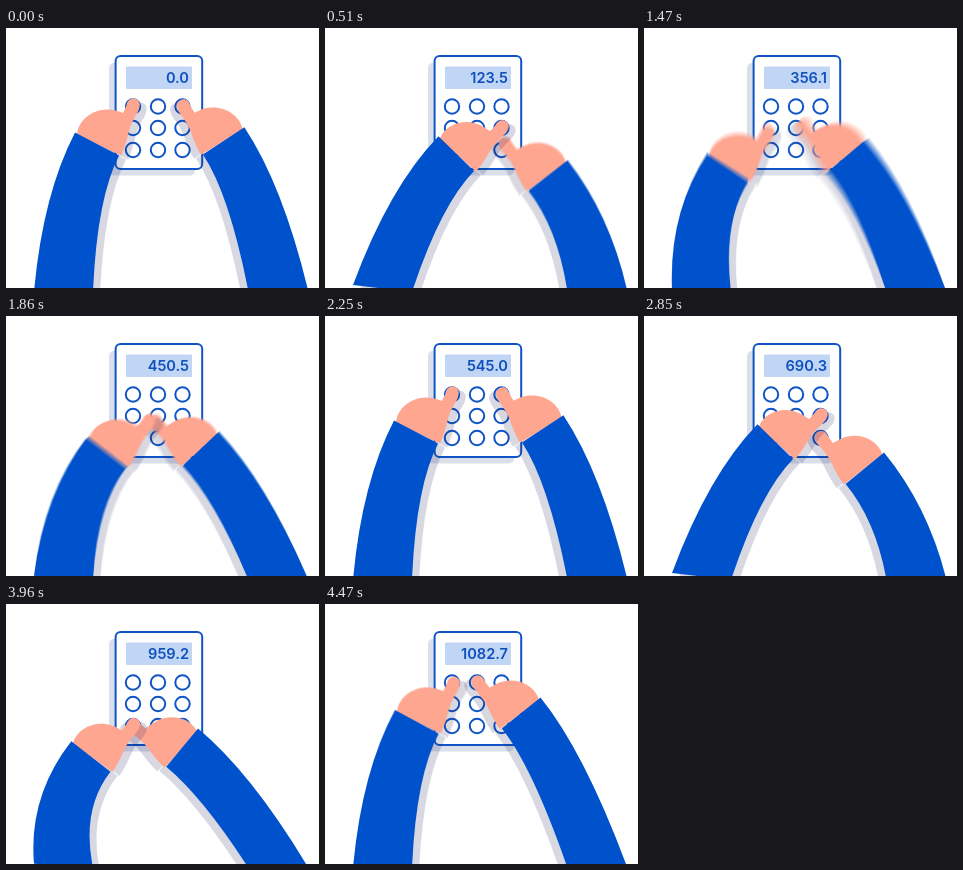
Write an HTML page that moves like this. It is 313 px wide and 260 px high and loops after 4500 ms.

```html
<!DOCTYPE html>
<html lang="en">
<head>
<meta charset="utf-8">
<title>Calculator</title>
<style>
html, body { margin: 0; width: 100%; height: 100%; overflow: hidden; background: #fff; }
svg { display: block; width: 100vw; height: 100vh; }
text { font: 600 14.6px Inter, "Liberation Sans", sans-serif; fill: #0f50be; text-anchor: end; }
</style>
</head>
<body>
<svg id="stage" viewBox="0 0 313 260">
  <defs>
    <g id="calc">
      <rect width="313" height="260" fill="#fff"/>
      <rect x="103" y="35" width="86" height="112.5" rx="5" fill="#dadfea"/>
      <rect x="109.6" y="28" width="86.6" height="113" rx="5" fill="#fff" stroke="#0f54c6" stroke-width="2"/>
      <rect x="120" y="38.5" width="66" height="22.5" rx="1" fill="#c1d6f4"/>
      <g id="keys" fill="#fff" stroke="#0f54c6" stroke-width="2"></g>
    </g>
    <path id="hand" d="M71 107C72 93 86 82 101 82C108 82 113 84 117 85.5L120.5 78C121.5 73 124 71 127.5 71C132 71 134.5 75 133.5 79C133 83 130.5 87 129 89L125 97C122 104 122 112 115 128Z"/>
  </defs>
  <g id="scene"></g>
  <text id="sum" x="183" y="54.6">0.0</text>
</svg>
<script>
const LOOP = 4500, STEP = 30, CYCLE = 75, TOTAL = 1090;
const SAMPLES = 8, SHUTTER = 0.65;
const COLS = [127, 152, 176.5], ROWS = [78.5, 100, 122];
const MIRROR = 303, TIP = { x: 127, y: 79 };

// moves: [start step, end step, key 1-9]
const arms = [
  { mirror: true, first: 3, outer: 0.5, inner: 60.5, dx: -1.5, dy: 0.8, tilt: 33.7, perX: 0.22, perY: 0.133,
    moves: [[4, 10, 6], [13, 19, 9], [33, 39.5, 3], [46.2, 52.2, 7], [58, 64, 5], [66, 72, 2]] },
  { mirror: false, first: 1, outer: 28, inner: 87, dx: 0, dy: 0, tilt: 27.6, perX: 0.235, perY: 0.24,
    moves: [[6, 14, 6], [24, 31, 2], [34, 40, 3], [41, 45.5, 1], [45.5, 51.5, 7], [58, 64, 5], [68, 75.5, 1]] }
];

const $ = id => document.getElementById(id);

function make(parent, tag, attrs = {}) {
  const el = document.createElementNS("http://www.w3.org/2000/svg", tag);
  for (const k in attrs) el.setAttribute(k, attrs[k]);
  return parent.appendChild(el);
}

const smooth = p => p * p * (3 - 2 * p);
const mix = (a, b, p) => a + (b - a) * p;

function keyPos(arm, n) {
  const x = COLS[(n - 1) % 3], y = ROWS[Math.floor((n - 1) / 3)];
  return { x: arm.mirror ? MIRROR - x : x, y };
}

// Thumb position; the hand draws back a little while it travels.
function tipAt(arm, s) {
  let at = keyPos(arm, arm.first);
  for (const [from, to, key] of arm.moves) {
    if (s <= from) break;
    const p = Math.min(1, (s - from) / (to - from)), e = smooth(p), next = keyPos(arm, key);
    at = { x: mix(at.x, next.x, e) - 4 * Math.sin(Math.PI * e), y: mix(at.y, next.y, e) };
  }
  return at;
}

function poseAt(arm, s) {
  const t = tipAt(arm, s);
  const turn = arm.tilt - 27.6 + arm.perX * (t.x - 127) + arm.perY * (t.y - 79);
  const a = turn * Math.PI / 180, c = Math.cos(a), n = Math.sin(a);
  const x = t.x + arm.dx, y = t.y + arm.dy;
  const place = (u, v) => [x + u * c - v * n, y + u * n + v * c];
  const [ox, oy] = place(-58, 26), [ix, iy] = place(-14, 49);
  const len = Math.hypot(ix - ox, iy - oy);
  const px = (oy - iy) / len, py = (ix - ox) / len;
  const baseY = 264 - 0.42 * Math.max(0, turn) * (arm.mirror ? 0 : 1);
  const f = v => v.toFixed(2);
  return {
    hand: `translate(${f(x)} ${f(y)}) rotate(${f(turn)}) translate(${-TIP.x} ${-TIP.y})`,
    sleeve: `M${f(ox)} ${f(oy)}Q${f(ox + 70 * px)} ${f(oy + 70 * py)} ${arm.outer} ${f(baseY)}` +
      `L${arm.inner} 264Q${f(ix + 48 * px)} ${f(iy + 48 * py)} ${f(ix)} ${f(iy)}Z`
  };
}

function makeArm(parent, arm) {
  const g = make(parent, "g", arm.mirror ? { transform: `matrix(-1 0 0 1 ${MIRROR} 0)` } : {});
  const shade = make(g, "g", { fill: "#1e1e5a", opacity: 0.17, transform: "translate(7 4)" });
  const skin = make(g, "g", { fill: "#ffa691" }), cloth = make(g, "g", { fill: "#0052cc" });
  const hands = [shade, skin].map(p => make(p, "use", { href: "#hand" }));
  const sleeves = [shade, cloth].map(p => make(p, "path"));
  return s => {
    const pose = poseAt(arm, s);
    hands.forEach(h => h.setAttribute("transform", pose.hand));
    sleeves.forEach(v => v.setAttribute("d", pose.sleeve));
  };
}

for (const y of ROWS) for (const x of COLS) make($("keys"), "circle", { cx: x, cy: y, r: 7.2 });

// Opaque layers at opacity 1/k average into motion blur.
const layers = Array.from({ length: SAMPLES }, (_, i) => {
  const g = make($("scene"), "g", { opacity: 1 / (i + 1) });
  make(g, "use", { href: "#calc" });
  return { g, set: arms.map(arm => makeArm(g, arm)) };
});

function draw(ms) {
  const step = Math.floor(ms / STEP), s = step % CYCLE;
  const moving = arms.some(a => a.moves.some(([from, to]) =>
    s + SHUTTER / 2 > from && s - SHUTTER / 2 < to));
  layers.forEach(({ g, set }, i) => {
    const shown = moving || i === 0;
    g.style.display = shown ? "" : "none";
    if (!shown) return;
    const shift = moving ? (i / (SAMPLES - 1) - 0.5) * SHUTTER : 0;
    const at = Math.max(0, s + shift);
    set.forEach(fn => fn(at));
  });
  $("sum").textContent = (TOTAL * step * STEP / LOOP).toFixed(1);
}

const start = performance.now();
function tick() {
  draw((performance.now() - start) % LOOP);
  requestAnimationFrame(tick);
}
tick();
</script>
</body>
</html>
```
